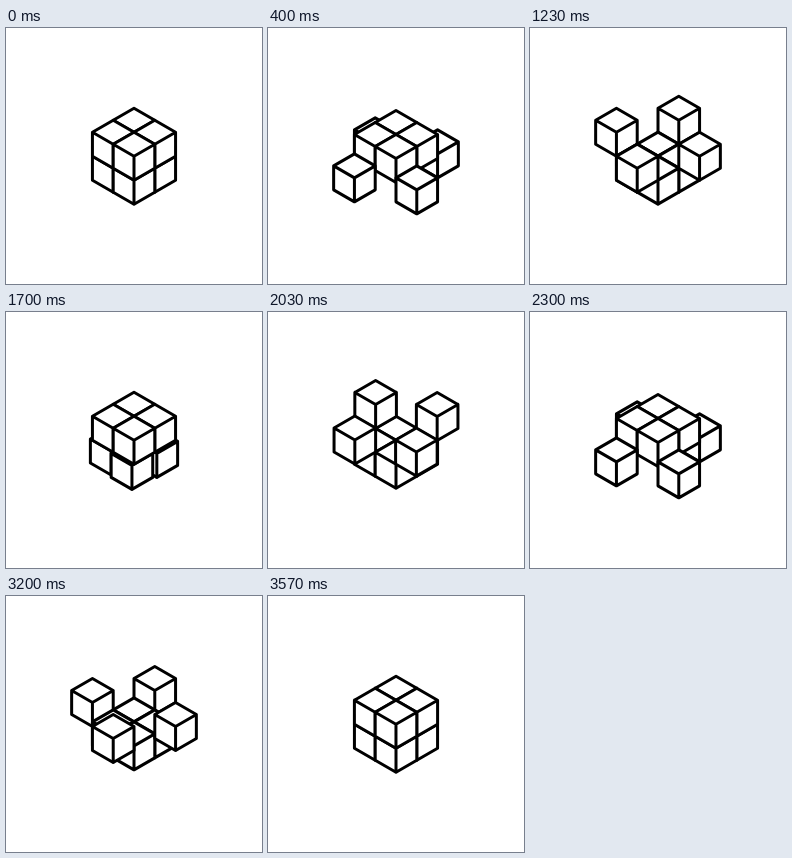
Animation, 256 px wide and 256 px high, one loop 3610 ms. Source, as an HTML page with a canvas:

```html
<!DOCTYPE html>
<html lang="en">
<head>
<meta charset="utf-8">
<title>Cube shuffle</title>
<style>
  html, body { margin: 0; width: 100%; height: 100%; overflow: hidden; background: #fff; }
  canvas { display: block; width: 256px; height: 256px; }
</style>
</head>
<body>
<canvas id="stage" width="256" height="256"></canvas>
<script>
const ctx = document.getElementById('stage').getContext('2d');

const LOOP = 3610, MOVE = 300;
const EDGE = 24, W = EDGE * Math.sqrt(3) / 2, H = EDGE / 2;
const CX = 128, TOP = 80.2;

// Grid cells: u runs right-front, v runs left-front; listed back to front.
const BACK = [0, 0], LEFT = [0, 1], RIGHT = [1, 0], FRONT = [1, 1];
const CELLS = [BACK, LEFT, RIGHT, FRONT];

// Two mirrored pinwheels: cell and its outward direction, back to front.
const SPIN_A = [[BACK, [-1, 0]], [RIGHT, [0, -1]], [LEFT, [0, 1]], [FRONT, [1, 0]]];
const SPIN_B = [[BACK, [0, -1]], [LEFT, [-1, 0]], [RIGHT, [1, 0]], [FRONT, [0, 1]]];

// Each exchange: a layer opens, trades height with the other, closes.
const EXCHANGES = [
  { spin: SPIN_A, from: 0 },
  { spin: SPIN_B, from: 1 },
  { spin: SPIN_A, from: 1 },
  { spin: SPIN_B, from: 0 },
];

const clamp = x => Math.min(1, Math.max(0, x));

function ease(x) {
  x = clamp(x);
  return x < 0.5 ? 8 * x ** 4 : 1 - 8 * (1 - x) ** 4;
}

function drawCube([u, v, z]) {
  const x = CX + (u - v) * W;
  const y = TOP + H + (u + v) * H + (1 - z) * EDGE;
  ctx.beginPath();
  ctx.moveTo(x, y - H);
  ctx.lineTo(x + W, y);
  ctx.lineTo(x + W, y + EDGE);
  ctx.lineTo(x, y + H + EDGE);
  ctx.lineTo(x - W, y + EDGE);
  ctx.lineTo(x - W, y);
  ctx.closePath();
  ctx.fill();
  ctx.moveTo(x - W, y);
  ctx.lineTo(x, y + H);
  ctx.lineTo(x + W, y);
  ctx.moveTo(x, y + H);
  ctx.lineTo(x, y + H + EDGE);
  ctx.stroke();
}

function render(time) {
  const step = Math.floor((3 * Math.floor(time / 10) + 1) / 10);
  const t = step * 100 / 3;
  const span = 3 * MOVE;
  const { spin, from } = EXCHANGES[Math.floor(t / span + 1e-6) % EXCHANGES.length];
  const phase = t % span / MOVE;

  const open = ease(phase) - ease(phase - 2);
  const swap = ease(phase - 1);
  const z = from ? 1 - swap : swap;

  const outer = spin.map(([[u, v], [du, dv]]) => [u + du * open, v + dv * open, z]);
  const inner = CELLS.map(([u, v]) => [u, v, 1 - z]);

  let order;
  if (phase > 1 && phase < 2) order = [...outer.slice(0, 2), ...inner, ...outer.slice(2)];
  else order = z < 0.5 ? [...outer, ...inner] : [...inner, ...outer];

  ctx.fillStyle = '#fff';
  ctx.fillRect(0, 0, 256, 256);
  ctx.strokeStyle = '#000';
  ctx.lineWidth = 3;
  ctx.lineJoin = ctx.lineCap = 'round';
  order.forEach(drawCube);
}

const start = performance.now();
function tick() {
  render((performance.now() - start) % LOOP);
  requestAnimationFrame(tick);
}
tick();
</script>
</body>
</html>
```
